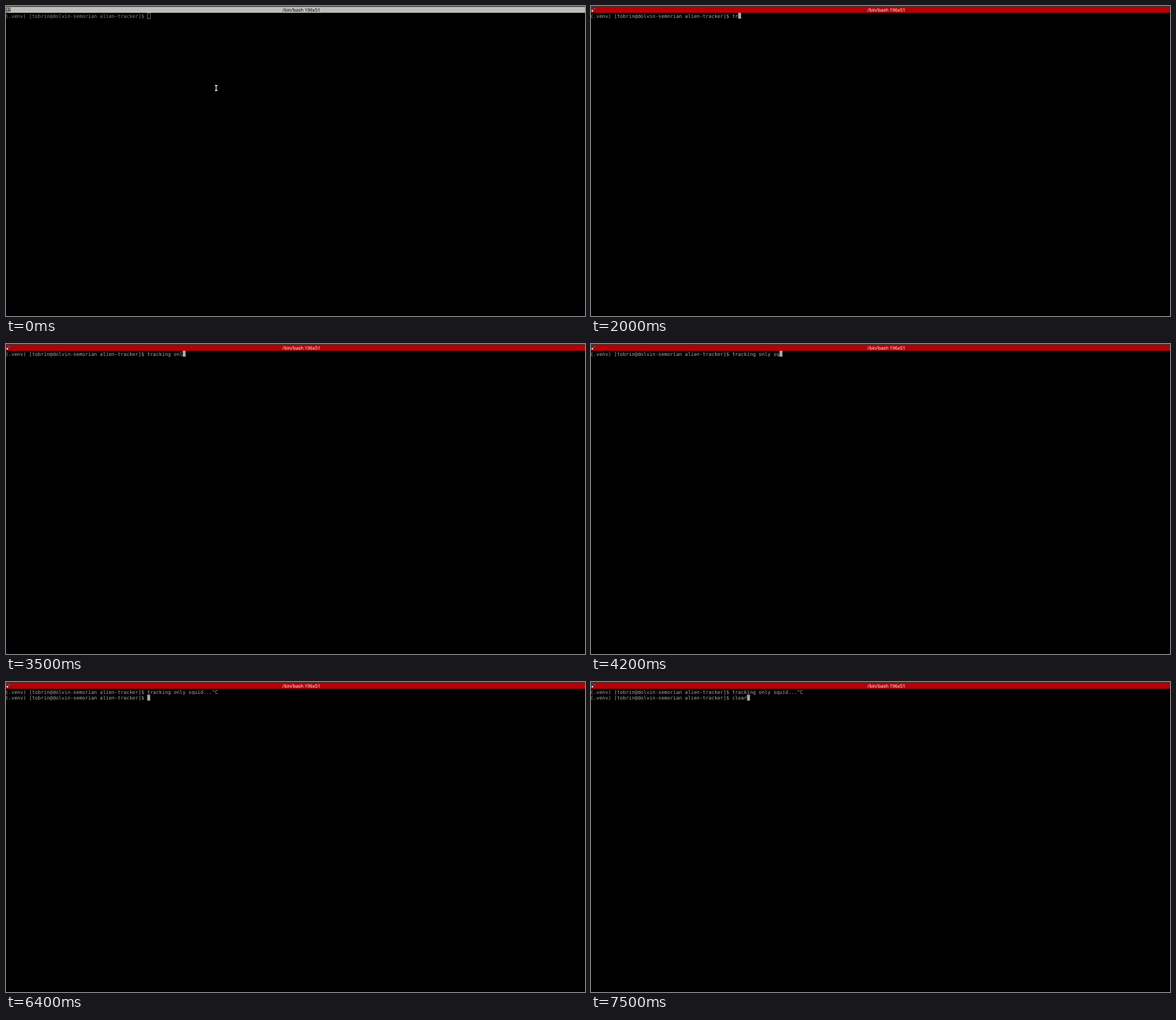
Animation, 1022 px wide and 548 px high, one loop 8000 ms. Source, as an HTML page:

```html
<!DOCTYPE html>
<html lang="en">
<head>
<meta charset="utf-8">
<title>Terminal</title>
<style>
  html, body { margin: 0; width: 100%; height: 100%; overflow: hidden; background: #000; }
  svg { display: block; width: 1022px; height: 548px; }
  text { white-space: pre; text-rendering: geometricPrecision; }
  .title { font: 8.2px "Noto Sans", "Open Sans", sans-serif; text-anchor: middle; }
  .line { font: 8.661px "DejaVu Sans Mono", monospace; }
  .focused .bar { fill: #b60005; }
  .focused .title { fill: #fff; }
  .focused .line { fill: #aaa; }
  .focused .cursor { fill: #aaa; stroke: none; }
  .focused .idle, .unfocused .busy { display: none; }
  .unfocused .bar { fill: #bfbdb9; }
  .unfocused .title { fill: #000; }
  .unfocused .line { fill: #858585; }
  .unfocused .cursor { fill: none; stroke: #999; stroke-width: .7; }
</style>
</head>
<body>
<svg id="stage" class="unfocused" viewBox="0 0 1022 548">
  <rect width="1022" height="548" fill="#000"/>
  <rect width="1022" height="2" fill="#373735"/>
  <rect class="bar" y="1.5" width="1022" height="10.5"/>
  <text class="title" x="521.5" y="9.9">/bin/bash 196x51</text>

  <g class="idle" fill="none" stroke="#222" stroke-width=".9">
    <path d="M.9 3.4H7.2V7.2H.9ZM.9 7.2V10H4.4V3.4M5.6 8.8H8.2M6.9 7.5V10"/>
  </g>
  <g class="busy">
    <rect x="3.8" y="3.3" width="4.2" height="4.2" fill="#26354a"/>
    <rect x="4.8" y="4.2" width="2" height="1.6" fill="#7892ad"/>
    <rect x=".6" y="6.4" width="3.8" height="3.8" fill="#412029"/>
    <rect x="1.1" y="6.9" width="2.7" height="2.8" fill="#e4e4e4"/>
  </g>

  <text class="line" x="-1" y="20.5"></text>
  <text class="line" x="-1" y="31"></text>
  <rect class="cursor" width="5.2" height="10.3"/>

  <g id="pointer" fill="none">
    <path id="beam" d="M368.9 140.9H370.2L371 141.6L371.8 140.9H373.1M371 141.6V148.4M368.9 149.1H370.2L371 148.4L371.8 149.1H373.1" stroke="#eee" stroke-width="2.3"/>
    <path d="M371 141.4V148.6" stroke="#000" stroke-width=".8"/>
  </g>
</svg>
<script>
const LOOP = 8000, PITCH = 1022 / 196, ROW = 10.5;
const PROMPT = "(.venv) [tobrin@dolvin-semorian alien-tracker]$ ";
const COMMAND = "tracking only squid...";

// time in ms, number of characters typed
const typing = [
  [0, 0], [1900, 1], [2000, 2], [2200, 3], [2300, 5], [2600, 6], [2700, 7],
  [2800, 8], [3000, 9], [3100, 10], [3200, 11], [3500, 12], [3600, 13],
  [3900, 15], [4200, 16], [4300, 18], [4500, 19], [4800, 20], [5000, 21], [5500, 22]
];
const FOCUS = 700, BLINK_OFF = 1200, BLINK_ON = 1700, BREAK = 6400, CLEAR = 7500;

const stage = document.getElementById("stage");
const pointer = document.getElementById("pointer");
const cursor = stage.querySelector(".cursor");
const lines = stage.querySelectorAll(".line");

function setText(node, text) {
  if (node.textContent !== text) node.textContent = text;
}

function show(node, visible) {
  node.setAttribute("visibility", visible ? "visible" : "hidden");
}

function draw(t) {
  const focused = t >= FOCUS;
  const broken = t >= BREAK;
  const count = typing.filter(step => step[0] <= t).pop()[1];
  const first = PROMPT + COMMAND.slice(0, count) + (broken ? "^C" : "");
  const second = broken ? PROMPT + (t >= CLEAR ? "clear" : "") : "";
  const column = (broken ? second : first).length;
  const inset = focused ? 0 : 0.4;

  stage.setAttribute("class", focused ? "focused" : "unfocused");
  setText(lines[0], first);
  setText(lines[1], second);
  cursor.setAttribute("x", column * PITCH - 1 + inset);
  cursor.setAttribute("y", (broken ? 12 + ROW : 12) + inset);
  show(cursor, t < BLINK_OFF || t >= BLINK_ON);
  show(pointer, t < BLINK_ON);
}

const start = performance.now();
function tick() {
  draw((performance.now() - start) % LOOP);
  requestAnimationFrame(tick);
}
draw(0);
requestAnimationFrame(tick);
</script>
</body>
</html>
```
